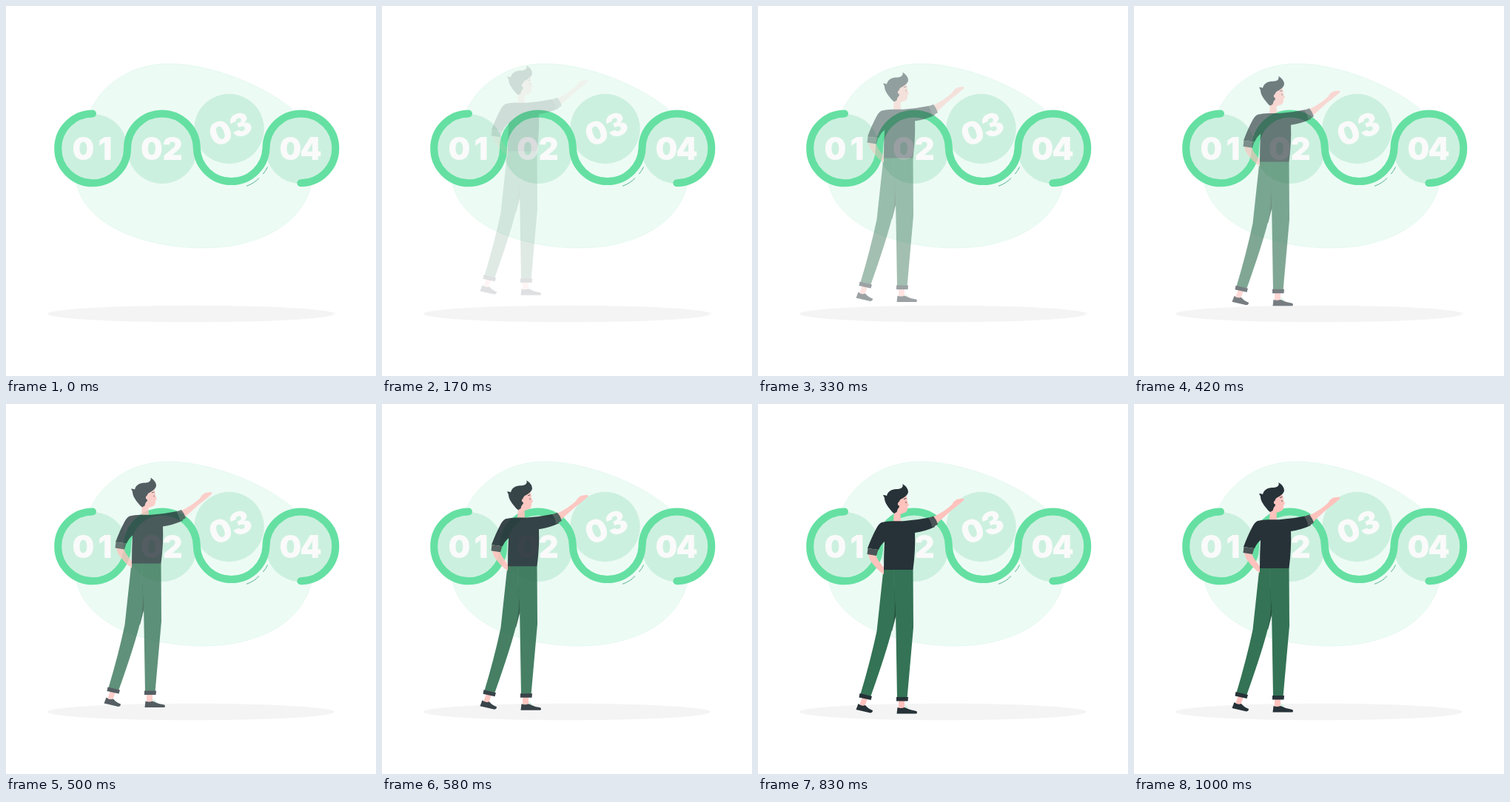
Write an HTML page that moves like this. It is 500x500 px and loops after 1.04 s.

```html
<!DOCTYPE html>
<html lang="en">
<head>
<meta charset="utf-8">
<title>Four steps</title>
<style>
  html, body { margin: 0; width: 100%; height: 100%; overflow: hidden; background: #fff; }
  svg { display: block; width: 100%; height: 100%; }
  text { font: 900 42px Inter, "Liberation Sans", sans-serif; fill: #fafafa; text-anchor: middle; }
  .disc { fill: #ccf0df; }
  .dark { fill: #263238; }
  .cuff { fill: #4b5456; }
  .skin { fill: #ffc2bd; }
  .pants { fill: #347355; }
</style>
</head>
<body>
<svg viewBox="0 0 500 500">
  <path fill="#edfbf5" stroke="#c9f2e0" stroke-width=".4" d="M220 78C273 78 343 104 385 138C408 157 416 184 416 215C416 288 350 327 265 327C190 326 110 300 95 240C90 205 104 160 115 139C133 104 170 78 220 78Z"/>
  <ellipse cx="250" cy="416" rx="194" ry="11.3" fill="#f4f4f4"/>

  <g class="disc">
    <circle cx="117" cy="193" r="47"/>
    <circle cx="211" cy="193" r="47"/>
    <circle cx="398" cy="193" r="47"/>
    <circle cx="301.5" cy="166" r="47.2"/>
  </g>
  <g id="labels"></g>

  <path fill="none" stroke="#65e0a2" stroke-width="10" stroke-linecap="round"
    d="M117 145.5A46.9 46.9 0 1 0 164 192.3A46.9 46.9 0 0 1 257.8 192.3A46.9 46.9 0 0 0 351.5 192.3A46.9 46.9 0 1 1 398.3 239.2"/>
  <path fill="none" stroke="#55b58a" d="M325 243.3Q335 240 342 232.5M347.3 227Q351 223 353.5 217.5"/>

  <g id="person">
    <!-- legs and feet -->
    <path class="skin" d="M141 394L148 396L144 407L137 405ZM190 398H198V411H190Z"/>
    <path fill="#bdeed6" d="M198 404L203 409L200 410Z"/>
    <path class="dark" d="M135.500 403Q140 407 145 405Q149 410 155 412Q155 415 152 415.500L132.500 411ZM188.500 408Q193 410 198 408Q206 412 214 413Q216 415 214 416.500H187.500Z"/>
    <path fill="#26543f" d="M183 222L189 222L188 278L181 305L176 300Z"/>
    <path class="pants" d="M169.500 221.500H186L184 248Q187 280 181 303Q174 332 152 394L138.500 390Q152 345 160.500 305Z"/>
    <path class="pants" d="M183.500 221.500H209.500L210 300Q206 345 201.500 396H188L186 276L184 248Z"/>
    <path fill="none" stroke="#43805f" stroke-width=".6" d="M183.500 223L184 248"/>
    <path class="dark" d="M137.500 389L154 393L152.500 398L136.500 394.500ZM187 394H203L202.500 399.500H187Z"/>

    <!-- arms, neck and face -->
    <path class="skin" d="M149 201L160 203Q160 207 170 219V228Q160 222 151 208Z"/>
    <path class="skin" d="M236 151Q251 144 262 134Q266 127 270 126.500L277 125.500Q280 127 277 129L270 135Q265 139 261 142L241 160Z"/>
    <path class="skin" d="M184 142L192 126L200 121Q202 125 202 130L204 134.500Q204 136 202 136.500Q203 143 198 145Q195 146 192.500 147L193 157H183Z"/>
    <path fill="none" stroke="#263238" stroke-width=".8" d="M197 126.500L200.500 125.500M200 130V132"/>

    <!-- shirt -->
    <path class="dark" d="M167 158Q175 156 183 156.300H196Q214 155 231 151.500L239 164Q226 170 212 172Q213 195 209.500 222H170Q170 203 171 184Q166 188 163 195L148 193Q154 177 160 166Q163 160 167 158Z"/>
    <path class="cuff" d="M148.500 193L162.500 195L160 203L147.500 201ZM230 152L237 149.500Q241 154 243 160.500L235.500 165Q234 157 230 152Z"/>

    <!-- hair -->
    <path class="dark" d="M195.500 106Q203 111 203 117C202 123 195 125 192 127.500L190.500 130L191 137Q188 140 187.500 144L184 146Q181 144 179 141C174 135 171 130 171 125L169 121Q172 121 174 122C176 114 183 113 189 113Q197 112 195.500 106Z"/>
    <circle class="skin" cx="191.500" cy="133" r="2.600"/>
  </g>
</svg>
<script>
const person = document.getElementById("person");
const LOOP = 1040, STEP = 1000 / 24;

const label = (digit, x, x0) =>
  `<text x="${x0}" y="208">0</text><text x="${x}" y="208">${digit}</text>`;
document.getElementById("labels").innerHTML =
  label(1, 134, 104.5) + label(2, 225, 197) + label(4, 412, 384.5) +
  `<g transform="translate(303.500 166) rotate(-22) translate(-211 -193)">${label(3, 225.5, 196.5)}</g>`;

const bezier = (a, b, u) => 3 * (1 - u) ** 2 * u * a + 3 * (1 - u) * u * u * b + u ** 3;

// Ease in, overshoot, settle
function ease(p) {
  let lo = 0, hi = 1;
  for (let i = 0; i < 30; i++) {
    const mid = (lo + hi) / 2;
    if (bezier(.36, .5, mid) < p) lo = mid; else hi = mid;
  }
  return bezier(-.01, 1.38, lo);
}

const start = performance.now();
function draw(now) {
  const time = Math.max(0, now - start) % LOOP;
  const step = Math.min(24, Math.floor((time + 5) / STEP));
  const y = step < 2 ? 0 : ease((step + 1) / 25);
  person.setAttribute("opacity", Math.min(1, y));
  person.setAttribute("transform", `translate(0 ${30 * (y - 1)})`);
  requestAnimationFrame(draw);
}
draw(start);
</script>
</body>
</html>
```
